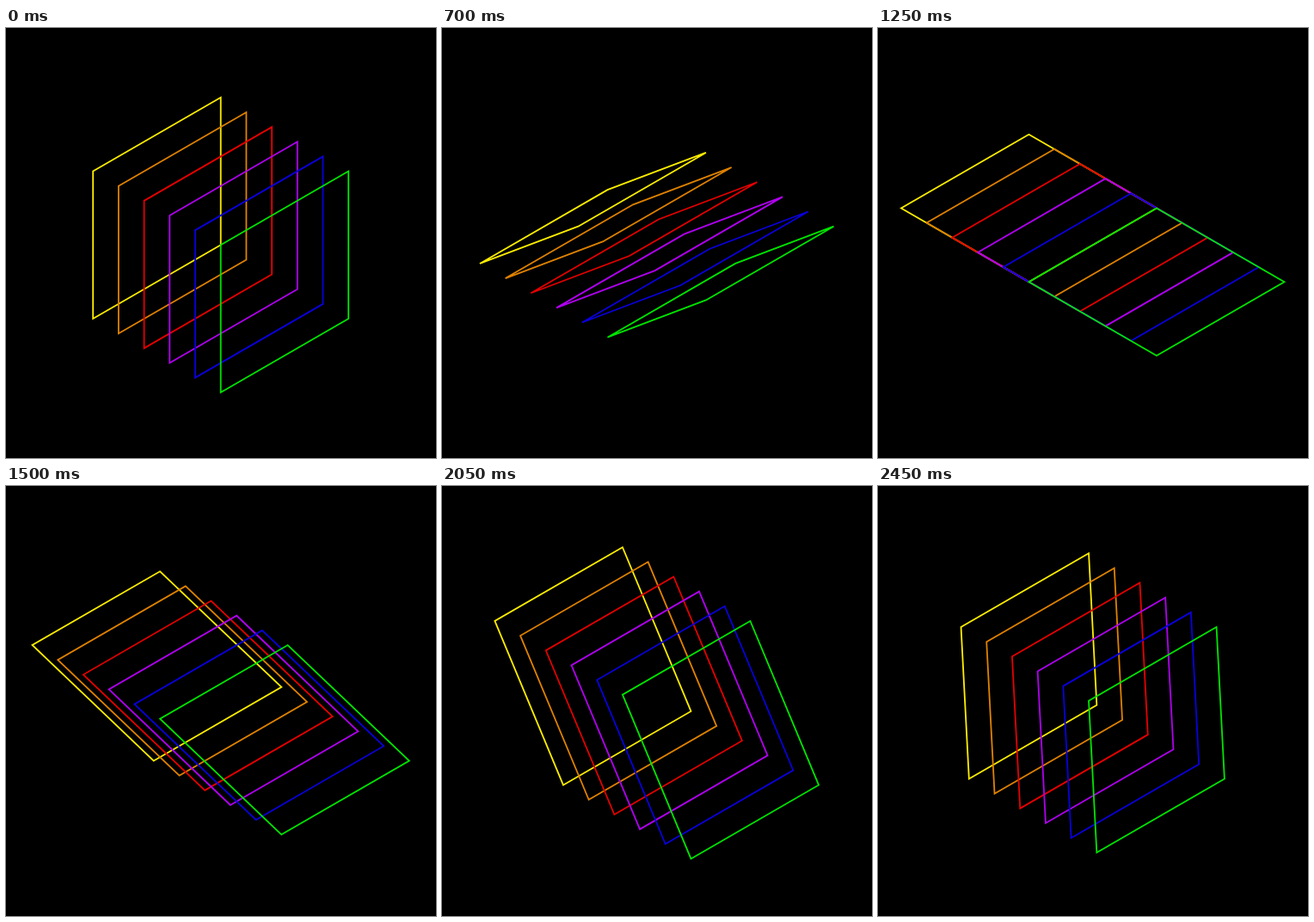
An HTML page with a canvas that plays this animation: 500 by 500 pixels, repeating every 2500 ms.

```html
<!DOCTYPE html>
<html lang="en">
<head>
<meta charset="utf-8">
<title>Rotating isometric squares</title>
<style>
  html, body { margin: 0; width: 100%; height: 100%; overflow: hidden; background: #000; }
  canvas { display: block; width: 500px; height: 500px; }
</style>
</head>
<body>
<canvas id="stage" width="500" height="500"></canvas>
<script>
const ctx = document.getElementById('stage').getContext('2d');
const colors = ['#ffee00', '#e08200', '#e60000', '#b000f0', '#0a00dc', '#00e600'];
const LOOP = 2500, STEP = 50;
const SIDE = 171.5, CX = 249.7, CY = 252.3;
const DX = SIDE * Math.cos(Math.PI / 6) / 2, DY = SIDE / 4;

function square(x, y, vx, vy) {
  ctx.beginPath();
  ctx.moveTo(x - DX - vx, y + DY - vy);
  ctx.lineTo(x + DX - vx, y - DY - vy);
  ctx.lineTo(x + DX + vx, y - DY + vy);
  ctx.lineTo(x - DX + vx, y + DY + vy);
  ctx.closePath();
  ctx.stroke();
}

function draw(ms) {
  // Half a turn per loop, in discrete steps; a square repeats after 180 degrees.
  const step = Math.floor((ms % LOOP + 2) / STEP);
  const angle = Math.PI * step * STEP / LOOP;
  const sin = Math.sin(angle), cos = Math.cos(angle);
  const vx = -DX * sin, vy = SIDE / 2 * cos - DY * sin;

  ctx.fillStyle = '#000';
  ctx.fillRect(0, 0, 500, 500);
  ctx.lineWidth = 1.8;
  colors.forEach((color, i) => {
    const k = i / 2.5 - 1;
    ctx.strokeStyle = color;
    square(CX + DX * k, CY + DY * k, vx, vy);
  });
}

function tick() {
  draw(performance.now());
  requestAnimationFrame(tick);
}
tick();
</script>
</body>
</html>
```
